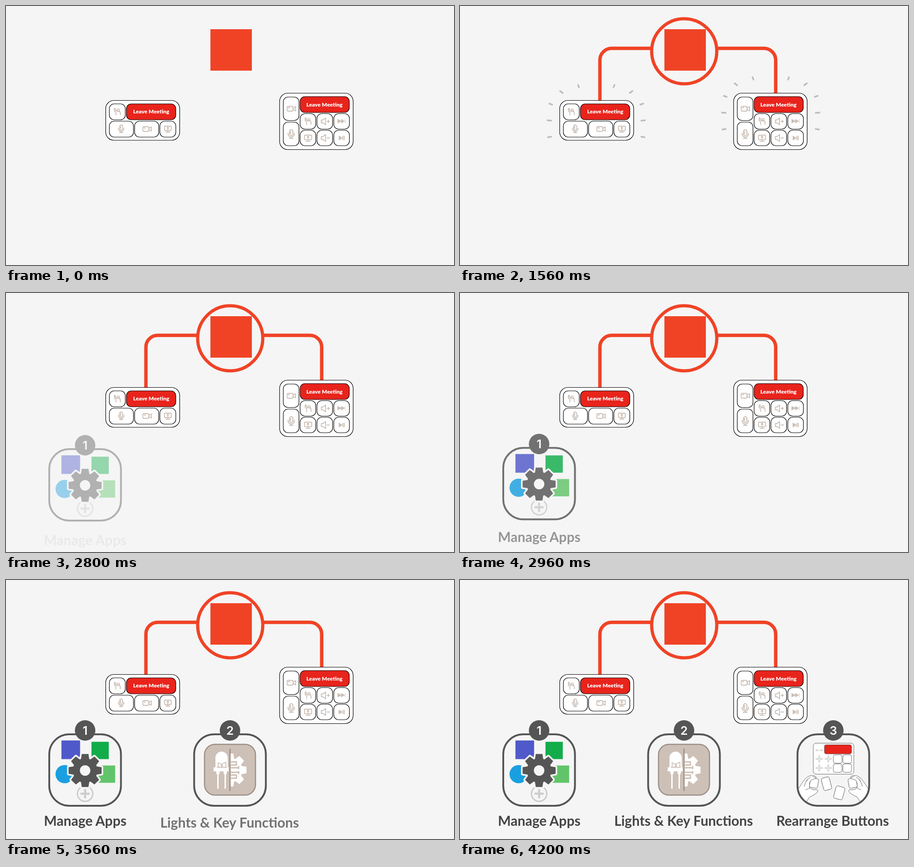
An HTML page that plays this animation: 984x569 px, repeating every 8040 ms.

```html
<!DOCTYPE html>
<html lang="en">
<head>
<meta charset="utf-8">
<title>Meeting keypads</title>
<style>
  html, body { margin: 0; width: 100%; height: 100%; overflow: hidden; background: #f5f5f5; }
  svg { display: block; width: 984px; height: 569px; }
  text { font-family: Lato, "Open Sans", sans-serif; font-weight: 700; text-anchor: middle; }
  .pad { fill: #fff; stroke: #000; stroke-width: 1.2; }
  .hot { fill: #e8241c; }
  .small { font-size: 12px; font-weight: 900; fill: #fff; }
  .label { font-size: 30px; fill: #444; }
  .num { font-family: Inter, Roboto, sans-serif; font-size: 26px; font-weight: 600; fill: #fff; }
  .icon { fill: none; stroke: #c9bdb4; stroke-width: 1.8; stroke-linecap: round; stroke-linejoin: round; }
  .solid { fill: #c9bdb4; stroke-width: 1; }
  .wire { fill: none; stroke: #f04326; stroke-width: 7.5; }
  .frame { fill: none; stroke: #555; stroke-width: 4; }
  .thin { fill: #fff; stroke: #444; stroke-width: .8; stroke-linejoin: round; }
</style>
</head>
<body>
<svg viewBox="0 0 984 569">
  <defs>
    <g id="hand" class="icon">
      <circle cx="2.5" cy="-3" r="2.6"/>
      <path d="M-6-6.5v3.5q0 3 3.5 4.5v6M-6-6.5q1.5-1.5 2.5 0v3q1 2 3.5 2.5h3q4 .5 4 4v4"/>
    </g>
    <g id="mic" class="icon">
      <rect x="-3.2" y="-8" width="6.4" height="11" rx="3.2"/>
      <path d="M-6-1v1a6 6 0 0 0 12 0v-1M0 6v2.5M-3.5 8.5h7M-2.8-4h2M-2.8-1.5h2"/>
    </g>
    <g id="cam" class="icon">
      <rect x="-9.5" y="-5" width="13" height="10.5" rx="2.5"/>
      <path d="M3.5-1l5.5-3.5v9.5l-5.5-3.5M-6.5-2h2.5"/>
    </g>
    <g id="screen" class="icon">
      <rect x="-7.5" y="-6" width="15" height="9.5" rx="1"/>
      <path d="M0 1.5v-5M-2-1.8l2-2 2 2M0 3.5v3M-4.5 7h9"/>
    </g>
    <path id="horn" class="icon" d="M-8.5-3h3.5l6-4.5v15l-6-4.5h-3.5z"/>
    <g id="louder"><use href="#horn"/><path class="icon" d="M4.5 0h5M7-2.5v5"/></g>
    <g id="softer"><use href="#horn"/><path class="icon" d="M4.5 0h5"/></g>
    <path id="skip" class="icon solid" d="M-8-4l7 4-7 4zM-.5-4l7 4-7 4zM8-4v8"/>
    <g id="play" class="icon"><path class="solid" d="M-5.5-4.5l7 4.5-7 4.5z"/><path d="M3-4v8M6-4v8"/></g>
    <rect id="frame" class="frame" x="-78.75" y="-78.5" width="157.5" height="157" rx="44"/>
    <clipPath id="half"><rect x="1.5" y="-60" width="60" height="120"/></clipPath>
    <clipPath id="inside"><rect x="-78" y="-78" width="156" height="156" rx="43"/></clipPath>
    <g id="grip" class="thin">
      <rect x="-8.5" y="-11" width="18" height="21" rx="4" transform="translate(-43 29) rotate(10)"/>
      <path d="M-79 44C-71 34-66 22-58 16Q-52 11-44 12L-39 14Q-36 17-40 19L-49 22Q-54 28-52 39Q-46 45-36 43Q-32 45-36 50Q-46 57-52 59Q-58 68-63 75L-79 72Z"/>
      <path fill="none" d="M-56 20q-6 7-8 16M-50 16q-7 3-10 9M-52 39q-4 4-9 4M-46 14l8 3"/>
    </g>
  </defs>

  <rect width="984" height="569" fill="#f5f5f5"/>
  <path id="wireL" class="wire" d="M418 93H333a25.7 25.7 0 0 0-25.7 25.7V207"/>
  <path id="wireR" class="wire" d="M567 93H667.700a25.700 25.700 0 0 1 25.700 25.700V192"/>
  <circle id="ring" cx="492.5" cy="99.5" r="71.5" fill="#f5f5f5" stroke="#f04326" stroke-width="7"/>
  <rect x="449" y="51" width="91" height="91" fill="#f04326"/>
  <path id="sparks" fill="none" stroke="#bdbdbd" stroke-width="3.5"/>
  <g id="pads"></g>

  <g id="card0" data-x="173.75">
    <use href="#frame"/>
    <rect x="-52" y="-65" width="41" height="41" fill="#5059c9"/>
    <rect x="14" y="-62" width="38" height="38" fill="#12ac4b"/>
    <circle cx="-45" cy="9" r="20" fill="#1a9fe0"/>
    <rect x="28" y="-10" width="38" height="38" fill="#62c46a"/>
    <g fill="none" stroke="#ccc">
      <circle cy="52" r="16.8" stroke-width="3"/>
      <path d="M-10 52h20M0 42v20" stroke-width="4.5"/>
    </g>
    <path class="gear" transform="translate(0 1)" fill="#555" stroke="#f5f5f5" stroke-width="7" stroke-linejoin="round" paint-order="stroke"/>
    <circle cy="1" r="11.5" fill="#f5f5f5"/>
  </g>

  <g id="card1" data-x="492">
    <use href="#frame"/>
    <rect x="-56" y="-56.5" width="112" height="111.5" rx="23" fill="#cdc0b7" stroke="#9d8e85" stroke-width="2.5"/>
    <path d="M0-47V46" stroke="#9d8e85" stroke-width="2.5"/>
    <g fill="#fff">
      <path d="M-32-6V-27a13.5 13.5 0 0 1 27 0V-6h2v9h-33v-9zM-30 3h7v6h-2v32h-3v-32h-2zM-14 3h7v6h-2v32h-3v-32h-2z"/>
      <path class="gear" clip-path="url(#half)"/>
    </g>
    <g fill="none" stroke="#cdc0b7" stroke-width="1.8">
      <path d="M-26-7v-9l7 3v6M-17-7v-7l8-3v10M-29-6h22"/>
      <path stroke-width="3" d="M2-18h12v7h-12M2-5h17M2 5h17M2 18h12v-7h-12M19-9v7M19 2v7"/>
    </g>
  </g>

  <g id="card2" data-x="820">
    <g clip-path="url(#inside)">
      <use href="#grip"/>
      <use href="#grip" transform="scale(-1 1)"/>
      <rect class="thin" x="-9" y="-14" width="18" height="28" rx="4" transform="translate(-15 30) rotate(-15)"/>
      <rect class="thin" x="-10" y="-14" width="20" height="28" rx="4" transform="translate(13 50) rotate(15)"/>
    </g>
    <g id="mini" class="thin">
      <rect x="-44" y="-59" width="89" height="68" rx="6"/>
      <rect class="hot" x="-19.5" y="-55.5" width="59.5" height="20" rx="4"/>
    </g>
    <path id="sockets" fill="none" stroke="#ddd" stroke-width="4.5" stroke-linecap="round"/>
    <use href="#frame"/>
  </g>

  <text class="label" id="label0" x="174" y="540">Manage Apps</text>
  <text class="label" id="label1" x="491" y="540">Lights &amp; Key Functions</text>
  <text class="label" id="label2" x="818.5" y="540">Rearrange Buttons</text>
</svg>
<script>
const LOOP = 8040, STEP = 40;
const $ = id => document.getElementById(id);
const clamp = v => Math.max(0, Math.min(1, v));
const box = (x, y, r, b, rx = 10.5, cls = '') =>
  `<rect class="pad ${cls}" x="${x}" y="${y}" width="${r - x}" height="${b - y}" rx="${rx}"/>`;
const icon = (id, x, y, s = 1) => `<use href="#${id}" transform="translate(${x} ${y}) scale(${s})"/>`;
const leave = (x, y) => `<text class="small" x="${x}" y="${y}">Leave Meeting</text>`;

// keypads
let pads = box(219, 207.5, 381.5, 295, 18)
  + box(227, 215, 262, 250) + box(264.5, 215, 373, 250, 10.5, 'hot') + leave(319, 235.5)
  + box(227, 253, 280, 288) + box(282.5, 253, 335.5, 288) + box(338, 253, 373, 288)
  + icon('hand', 244, 232) + icon('mic', 253, 269.5) + icon('cam', 310, 270) + icon('screen', 355.5, 270)
  + box(601, 191.5, 762.5, 315.5, 18)
  + box(609, 200, 643.5, 251.5) + box(609, 255, 643.5, 307)
  + box(646, 199, 754, 234, 10.5, 'hot') + leave(699.5, 220.5);
for (const y of [236.5, 273])
  for (const x of [646, 683, 720]) pads += box(x, y, x + 34.3, y + 34);
pads += icon('cam', 627, 225.5) + icon('mic', 626.5, 281, 1.15)
  + icon('hand', 663, 253) + icon('louder', 701, 253.5) + icon('skip', 737, 253)
  + icon('screen', 663.5, 290, 1.05) + icon('softer', 701, 290) + icon('play', 737, 290);
$('pads').innerHTML = pads;

// gear outline with eight teeth
const teeth = [];
for (let i = 0; i < 8; i++)
  for (const [r, a] of [[27, -.34], [37, -.2], [37, .2], [27, .34]]) {
    const q = i * Math.PI / 4 + a;
    teeth.push((r * Math.cos(q)).toFixed(2) + ' ' + (r * Math.sin(q)).toFixed(2));
  }
document.querySelectorAll('.gear').forEach(g => g.setAttribute('d', 'M' + teeth.join('L') + 'Z'));

// miniature keypad
let keys = '', sockets = 'M-37-43.5h3M-28-43.5h3';
for (const y of [0, 20]) {
  for (const x of [0, 21])
    keys += `<rect x="${x}" y="${y - 33.5}" width="19" height="18.5" rx="4"/>`;
  for (const x of [-31, -11])
    sockets += `M${x - 6} ${y - 24.5}h3m6 0h3M${x} ${y - 30.5}v3m0 6v3`;
}
$('mini').insertAdjacentHTML('beforeend', keys);
$('sockets').setAttribute('d', sockets);

// numbered badges
const cards = [0, 1, 2].map(i => {
  const g = $('card' + i);
  g.insertAdjacentHTML('beforeend',
    `<circle cy="-87" r="22.5" fill="#555"/><text class="num" y="-77.5">${i + 1}</text>`);
  return g;
});

// outer and inner ends of each spark, mirrored about the keypad's axis
const rays = [[108.5, 251, 97.5, 252], [107.5, 288.5, 97.5, 287], [104.5, 214, 95.5, 217],
  [80.5, 186, 72.5, 192], [40.5, 172, 37.5, 180]];

function sparkPath(p) {
  if (p < 0 || p >= 1) return '';
  let d = '';
  for (const [ox, oy, ix, iy] of rays) {
    const len = Math.hypot(ox - ix, oy - iy), ux = (ox - ix) / len, uy = (oy - iy) / len;
    const out = 16 * Math.min(1, p * 2), tail = (len + 16) * p;
    for (const [cx, dy] of [[299.3, 0], [682.5, -17]])
      for (const s of [-1, 1])
        d += `M${cx + s * (ix + ux * tail)} ${iy + uy * tail + dy}L${cx + s * (ox + ux * out)} ${oy + uy * out + dy}`;
  }
  return d;
}

const dash = (id, len) => $(id).setAttribute('stroke-dasharray', Math.max(0, len) + ' 999');

function rise(el, p, x, y, drop) {
  el.setAttribute('opacity', p);
  el.setAttribute('transform', `translate(${x} ${y + drop * (1 - p)})`);
}

const cardStart = [2632, 3148, 3680], labelStart = [2780, 3310, 3860];

function draw(t) {
  $('ring').setAttribute('opacity', t < 400 ? 0 : clamp((t - 360) / 200));
  dash('wireL', 75 + .35 * (t - 840));
  dash('wireR', 83 + .334 * (t - 840));
  $('sparks').setAttribute('d', sparkPath((t - (t < 2000 ? 1560 : 2000)) / 280));
  cards.forEach((g, i) => {
    rise(g, clamp((t - cardStart[i]) / 400), +g.dataset.x, 417.5, 7);
    rise($('label' + i), clamp((t - labelStart[i]) / 340), 0, 0, 15);
  });
}

const start = performance.now();
function tick() {
  const t = (performance.now() - start) % LOOP;
  draw(Math.floor(t / STEP) * STEP);
  requestAnimationFrame(tick);
}
tick();
</script>
</body>
</html>
```
